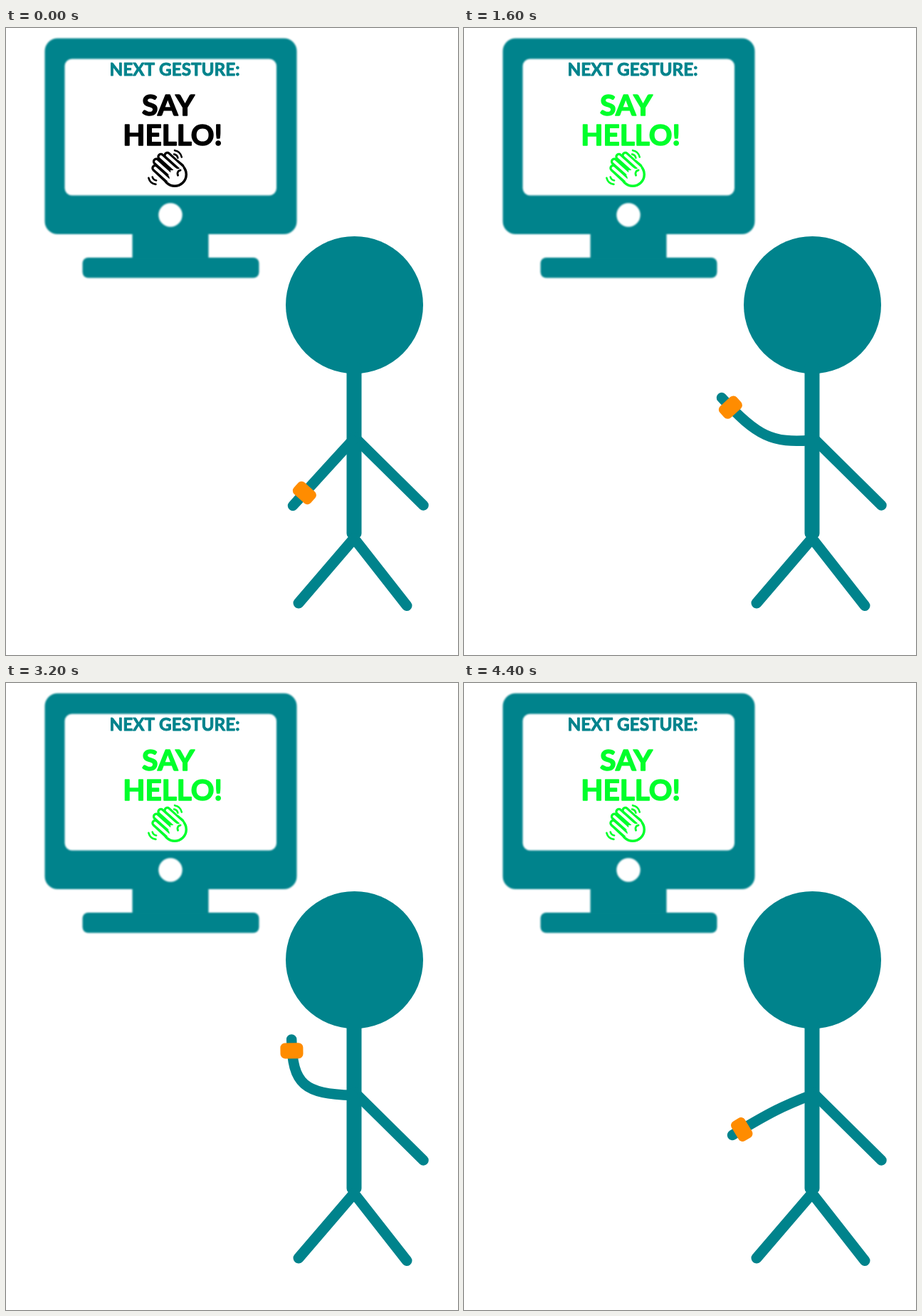
Animation of 635 by 882 pixels, one loop 4600 ms. Source, as an HTML page with a canvas:

```html
<!DOCTYPE html>
<html lang="en">
<head>
<meta charset="utf-8">
<title>Next gesture</title>
<style>
  html, body { margin: 0; width: 100%; height: 100%; overflow: hidden; background: #fff; }
  canvas { display: block; }
</style>
</head>
<body>
<canvas id="stage" width="635" height="882"></canvas>
<script>
const ctx = document.getElementById('stage').getContext('2d');
const TEAL = '#00838c', ORANGE = '#ff8c00', GREEN = '#00ff2b';
const LOOP = 4600, STEP = 200;
const RAISE = 1000, WAVE = 1600, LOWER = 3800, WAVE_PERIOD = 1100;

const point = (x, y) => ({ x, y });
const SHOULDER = point(487, 580);
const REST = { elbow: point(481, 586), hand: point(403, 672) };
const POINTING = { elbow: point(469, 586), hand: point(353, 619) };
const OUT = { elbow: point(421, 585), hand: point(362, 520) };
const UP = { elbow: point(402, 577), hand: point(402, 501) };
const LOW = { elbow: point(440, 598), hand: point(377, 636) };

const mix = (a, b, u) => point(a.x + (b.x - a.x) * u, a.y + (b.y - a.y) * u);
const blend = (a, b, u) => ({
  elbow: mix(a.elbow, b.elbow, u),
  hand: mix(a.hand, b.hand, u)
});

function poseAt(time) {
  if (time < RAISE) return REST;
  if (time < WAVE) return blend(POINTING, OUT, (time - RAISE) / (WAVE - RAISE));
  if (time > LOWER) return blend(OUT, LOW, (time - LOWER) / 600);
  const phase = (time - WAVE) / WAVE_PERIOD * Math.PI * 2;
  return blend(OUT, UP, (1 - Math.cos(phase)) / 2);
}

function box(x, y, w, h, r, color) {
  ctx.fillStyle = color;
  ctx.beginPath();
  ctx.roundRect(x, y, w, h, r);
  ctx.fill();
}

function disc(x, y, r, color) {
  ctx.fillStyle = color;
  ctx.beginPath();
  ctx.arc(x, y, r, 0, Math.PI * 2);
  ctx.fill();
}

function line(x1, y1, x2, y2, width, color) {
  ctx.strokeStyle = color;
  ctx.lineWidth = width;
  ctx.beginPath();
  ctx.moveTo(x1, y1);
  ctx.lineTo(x2, y2);
  ctx.stroke();
}

function arc(x, y, r, from, to, width, color) {
  ctx.strokeStyle = color;
  ctx.lineWidth = width;
  ctx.beginPath();
  ctx.arc(x, y, r, from, to);
  ctx.stroke();
}

function label(text, x, y, size, color) {
  ctx.font = `bold ${size}px Lato, sans-serif`;
  ctx.fillStyle = ctx.strokeStyle = color;
  ctx.lineWidth = size / 26;
  ctx.fillText(text, x, y);
  ctx.strokeText(text, x, y);
}

function drawWavingHand(color) {
  const cx = 237, cy = 206;
  disc(cx, cy, 18, color);
  line(240, 190, 246, 195, 9, color);
  disc(cx, cy, 14.5, '#fff');
  line(240, 191, 245, 197, 3, '#fff');
  for (let i = 0; i < 4; i++) {
    const angle = (249 - 17 * i) * Math.PI / 180;
    const reach = 27 + 5 * Math.sin(Math.PI * (i + 0.5) / 4);
    const x = cx + reach * Math.cos(angle), y = cy + reach * Math.sin(angle);
    line(x, y, x + 15, y + 14, 10.5, color);
    line(x, y, x + 20, y + 18, 4, '#fff');
  }
  arc(246, 205, 5, 2.7, 4.5, 3, color);
  for (const r of [6.5, 12]) {
    arc(235, 184, r, -1.4, -0.2, 2.6, color);
    arc(212, 208, r, 1.7, 2.9, 2.6, color);
  }
}

function drawMonitor(ink) {
  ctx.filter = 'blur(1px)';
  box(54.5, 14.5, 354, 275.5, 18, TEAL);
  box(82.5, 43.5, 297.5, 192, 10, '#fff');
  disc(231, 263, 16.7, '#fff');
  box(177.5, 286, 107, 40, 0, TEAL);
  box(107.5, 323, 248, 28.5, 8, TEAL);
  ctx.filter = 'none';
  label('NEXT GESTURE:', 237, 67, 24.3, TEAL);
  label('SAY', 228, 122.5, 41, ink);
  label('HELLO!', 234, 164.5, 40.5, ink);
  drawWavingHand(ink);
}

function drawBody() {
  disc(489.5, 389.5, 96.5, TEAL);
  box(478.5, 470, 21, 248, 7, TEAL);
  line(489, 575, 586.5, 671.5, 14.5, TEAL);
  line(489, 718, 411, 809, 15, TEAL);
  line(489, 718, 563, 812.5, 15, TEAL);
}

function drawArm({ elbow, hand }) {
  const c1 = mix(SHOULDER, elbow, 0.8), c2 = mix(hand, elbow, 0.85);
  ctx.strokeStyle = TEAL;
  ctx.lineWidth = 14.5;
  ctx.beginPath();
  ctx.moveTo(SHOULDER.x, SHOULDER.y);
  ctx.bezierCurveTo(c1.x, c1.y, c2.x, c2.y, hand.x, hand.y);
  ctx.stroke();

  const wrist = mix(hand, elbow, 0.21);
  ctx.save();
  ctx.translate(wrist.x, wrist.y);
  ctx.rotate(Math.atan2(hand.y - elbow.y, hand.x - elbow.x));
  box(-11, -16, 22, 32, 6.5, ORANGE);
  ctx.restore();
}

function frame() {
  const time = Math.floor(performance.now() % LOOP / STEP) * STEP;
  ctx.fillStyle = '#fff';
  ctx.fillRect(0, 0, 635, 882);
  ctx.lineCap = ctx.lineJoin = 'round';
  ctx.textAlign = 'center';
  drawMonitor(time < RAISE ? '#000' : GREEN);
  drawBody();
  drawArm(poseAt(time));
  requestAnimationFrame(frame);
}

frame();
</script>
</body>
</html>
```
